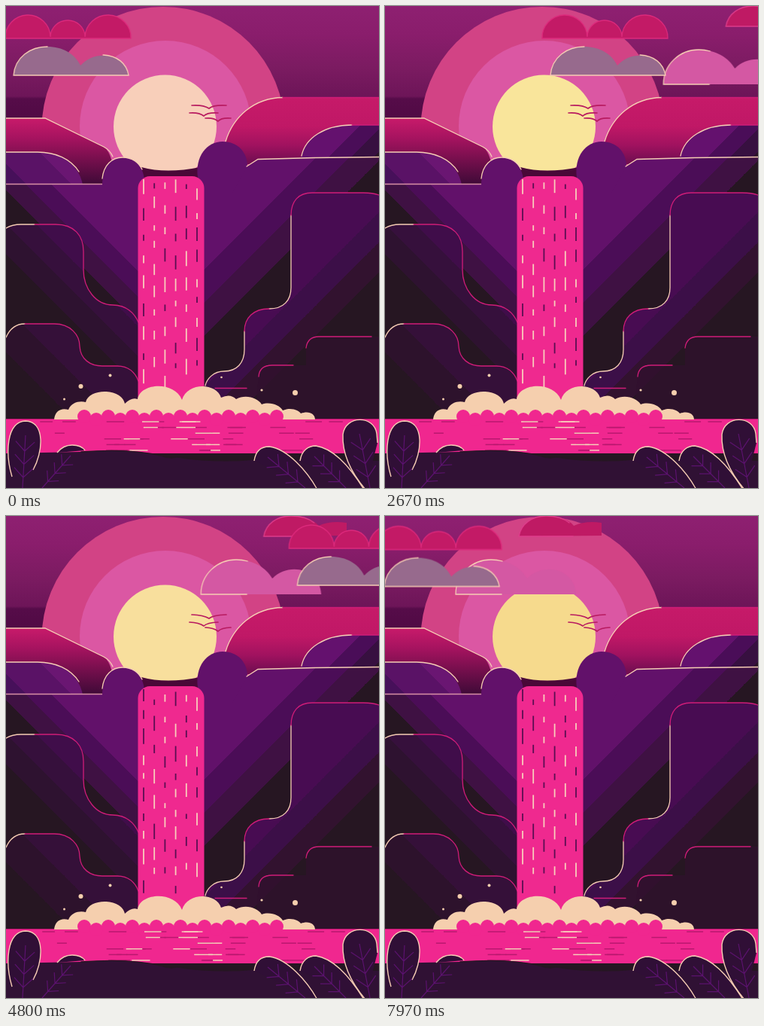
Write an HTML page that moves like this. It is 496 px wide and 640 px high and loops after 8000 ms.

```html
<!DOCTYPE html>
<html lang="en">
<head>
<meta charset="utf-8">
<title>Waterfall at dusk</title>
<style>
html, body { margin: 0; width: 100%; height: 100%; overflow: hidden; background: #251622; }
svg { display: block; width: 496px; height: 640px; }
.line { fill: none; stroke-width: 1.3; stroke-linecap: round; }
.cream { stroke: #f6cdb4; }
.pink { stroke: #cf1c78; }
.vein { fill: none; stroke: #5b126e; stroke-width: 1.2; }
.bird { fill: none; stroke: #b81b60; stroke-width: 1.7; stroke-linecap: round; }
.leaf { fill: #300f36; stroke: #f6cdb4; stroke-width: 1.4; }
</style>
</head>
<body>
<svg viewBox="0 0 496 640">
  <defs id="defs">
    <linearGradient id="sky" x2="0" y2="150" gradientUnits="userSpaceOnUse">
      <stop stop-color="#8e2071"/><stop offset=".25" stop-color="#8a1d6c"/>
      <stop offset=".55" stop-color="#7b1b61"/><stop offset=".8" stop-color="#6d1558"/>
      <stop offset=".82" stop-color="#560c49"/><stop offset="1" stop-color="#500a44"/>
    </linearGradient>
    <linearGradient id="redLeft" x2="0" y1="150" y2="236" gradientUnits="userSpaceOnUse">
      <stop stop-color="#c71a6a"/><stop offset=".3" stop-color="#a5135f"/>
      <stop offset="1" stop-color="#400a38"/>
    </linearGradient>
    <linearGradient id="redRight" x2="0" y1="122" y2="206" gradientUnits="userSpaceOnUse">
      <stop stop-color="#c61a69"/><stop offset=".45" stop-color="#c01866"/>
      <stop offset=".75" stop-color="#a0125f"/><stop offset="1" stop-color="#740e52"/>
    </linearGradient>
  </defs>

  <rect width="496" height="240" fill="url(#sky)"/>
  <circle cx="209" cy="162.500" r="161.500" fill="#d24385"/>
  <circle cx="212" cy="160" r="114" fill="#db57a3"/>
  <circle id="sun" cx="211.500" cy="160" r="68.500"/>

  <g id="highCloud">
    <path d="M0 27C3 10 18 0 36 0C52 0 66 4 73 13C83 8 97 7 110 9V26Z" fill="#bf1a64"/>
    <path class="line" stroke="#de3d8b" d="M72 27H0C3 10 18 0 36 0C50 0 60 3 67 9"/>
  </g>
  <g id="pinkCloud">
    <path d="M0 104C0 77 22 58 47 58C70 58 87 69 95 83C116 61 158 69 160 104Z" fill="#d458a3"/>
    <path class="line cream" d="M61 104H0C0 77 22 58 47 58Q55 58 62 60"/>
  </g>
  <g id="lowClouds">
    <path class="line" d="M0 43A30 30 0 0 1 60 41A23 22 0 0 1 106 41A30.500 30 0 0 1 167 43Z" stroke="#dd2a7c" style="fill:#c31a66"/>
    <path d="M11 92C13 68 33 54 56 54C76 54 92 63 100 79C119 57 159 63 164 92Z" fill="#976a8d"/>
    <path class="line cream" d="M130 65C149 66 161 76 164 92H11C13 68 33 54 56 54"/>
  </g>

  <path d="M0 149H52L130 187Q143 196 145 237H0Z" fill="url(#redLeft)"/>
  <path class="line cream" d="M0 149H52L130 187Q138 191 142 200"/>
  <path d="M290 210L292 180C302 147 330 122 368 121.500H496V210Z" fill="url(#redRight)"/>
  <path class="line cream" d="M292 180C302 147 330 122 368 121.500"/>
  <path class="line pink" d="M368 121.500H496"/>
  <path d="M392 203C397 176 422 158 455 158H496V203Z" fill="url(#knoll)"/>
  <path class="line cream" d="M393 199C398 175 424 158 460 158"/>
  <path class="line pink" d="M460 158H496"/>

  <path d="M0 236H128L183 215V550H0Z" fill="url(#wallLeft)"/>
  <path d="M256 214H318L335 203L400 201L496 200V550H256Z" fill="url(#wallRight)"/>
  <path d="M180 214Q213 223 258 214V240H180Z" fill="#4a0838"/>
  <path d="M0 194H42C73 194 96 209 102 237H0Z" fill="url(#mound)"/>
  <path class="line cream" d="M0 194H42C66 194 86 203 97 220"/>
  <path class="line" stroke="#d78fa5" d="M0 236.500H128"/>
  <path d="M128 238C128 214 139 201 155 201C172 201 183 214 184 232V246H128Z" fill="#62116a"/>
  <path class="line cream" d="M128 229C130 211 141 201 155 201C168 201 177 208 181 217"/>
  <path d="M255 228C251 200 267 180 288 180C309 180 321 195 321 213L300 250H263Z" fill="#62116a"/>
  <path class="line cream" d="M320 213L335 203.500L410 201.500L496 200.500"/>

  <path d="M0 295Q8 290 20 290H66C91 290 103 305 103 326V350C103 376 120 397 142 397C160 397 171 408 177 422V550H0Z" fill="url(#cliffLeft)"/>
  <path class="line cream" d="M0 295Q8 290 20 290H38"/>
  <path class="line pink" d="M38 290H66C91 290 103 305 103 326V350C103 376 120 397 142 397C160 397 171 408 176 420"/>
  <path d="M0 440Q8 422 25 422H64C86 422 98 437 98 452C99 469 112 478 128 478H148C163 478 172 487 177 502V550H0Z" fill="url(#ledge)"/>
  <path class="line cream" d="M0 440Q8 422 25 422"/>
  <path class="line pink" d="M25 422H64C86 422 98 437 98 452C99 469 112 478 128 478H148C163 478 172 487 176 498"/>

  <path d="M496 251Q488 248 475 248H407C389 248 379 259 379 275V374C379 391 369 402 350 402C329 402 317 414 317 432V456C317 474 307 485 290 485C276 485 267 495 264 506V550H496Z" fill="url(#cliffRight)"/>
  <path class="line cream" d="M379 278V374C379 391 369 402 350 402M317 432V456C317 474 307 485 290 485C276 485 267 495 265 504"/>
  <path class="line pink" d="M496 251Q488 248 475 248H407C389 248 379 259 379 278M350 402C329 402 317 414 317 432"/>
  <path d="M399 455Q400 439 416 439H496V550H330L336 492Q337 477 354 477H399Z" fill="#32102f" opacity=".65"/>
  <path class="line pink" d="M399 454Q401 439 416 439H486M336 492Q337 477 354 477H382M278 507.500H320"/>

  <rect x="175.500" y="226" width="88" height="320" rx="16" fill="#ef298f"/>
  <g id="falls"></g>

  <rect y="548" width="496" height="50" fill="#f0278f"/>
  <path d="M0 548.500H496" stroke="#b9166d"/>
  <path d="M64 549C65 538 73 533 83 536C87 526 98 524 106 526C110 507 154 507 158 528Q167 519 175 522C179 500 224 498 234 523C241 499 280 500 286 520Q298 514 306 522C318 515 335 520 340 529C351 525 364 530 368 537C379 532 390 537 392 541C402 537 411 541 411 549Z" fill="#f5cfae"/>
  <g id="bubbles" fill="#f0278f"></g>
  <g id="water"></g>
  <g fill="#f5cfae">
    <circle cx="99.500" cy="505" r="3"/><circle cx="138.500" cy="490.500" r="2"/>
    <circle cx="77.500" cy="522" r="1.500"/><circle cx="286.500" cy="493" r="1.300"/>
    <circle cx="340" cy="510" r="1.600"/><circle cx="384.500" cy="513.500" r="3.500"/>
  </g>

  <path d="M0 594H496V640H0Z" fill="#261622"/>
  <path d="M0 640V594L100 592Q165 587 205 597Q218 602 228 599Q280 607 330 602L496 604V640Z" fill="#301134"/>
  <path class="line" stroke="#261622" d="M100 592Q165 587 205 597Q218 602 228 599Q280 607 330 602"/>
  <path class="leaf" d="M68 593Q76 583 88 583Q100 583 105 590"/>
  <path class="leaf" d="M8 625C-1 595 0 552 26 551C53 552 49 593 36 616"/>
  <path class="leaf" d="M330 604C332 590 340 585 350 585C374 588 400 617 414 642"/>
  <path class="leaf" d="M391 604C393 590 402 584 412 584C438 588 460 616 476 642"/>
  <path class="leaf" d="M478 642C456 616 447 591 448 569C451 543 490 543 493 568L494 580"/>
  <g id="veins"></g>
  <g id="birds"></g>
</svg>
<script>
const LOOP = 8000, FLIP = 500;
const CREAM = '#f8cdbb', SHADE = '#5a0f52', NIGHT = '#261622';
const byId = id => document.getElementById(id);

function add(parent, tag, attrs) {
  const el = document.createElementNS('http://www.w3.org/2000/svg', tag);
  for (const key in attrs) el.setAttribute(key, attrs[key]);
  return parent.appendChild(el);
}

function random(seed) {
  return () => (seed = seed * 16807 % 2147483647) / 2147483647;
}

function play(el, frames, duration = LOOP) {
  el.animate(frames, { duration, iterations: Infinity });
}

const at = (ms, x, y = 0) => ({ offset: ms / LOOP, transform: `translate(${x}px, ${y}px)` });

// Flat diagonal bands of shade, falling to the left (side -1) or right (side 1).
function bands(id, side, x, y, reach, colors) {
  const gradient = add(byId('defs'), 'linearGradient', {
    id, x1: x, y1: y, x2: x + side * reach, y2: y + reach, gradientUnits: 'userSpaceOnUse'
  });
  const last = colors.length - 2;
  for (let i = 0; i <= last; i++)
    for (const color of [colors[i], colors[i + 1]])
      add(gradient, 'stop', { offset: i / last, 'stop-color': color });
}

bands('wallLeft', -1, 50, 227, 34, ['#62116a', '#4b0d57', '#3f1143', NIGHT]);
bands('wallRight', 1, 300, 313, 44, ['#62116a', '#4b0d57', '#3f1143', NIGHT]);
bands('cliffLeft', -1, 70, 320, 40, ['#400d4a', '#36103c', '#2e1230', NIGHT]);
bands('cliffRight', 1, 400, 370, 40, ['#480c52', '#3c0f48', '#32122f', NIGHT]);
bands('ledge', -1, 60, 460, 30, ['#351039', '#2d122c', NIGHT]);
bands('knoll', 1, 440, 190, 30, ['#64116e', '#4a0d58', '#371040', '#2a1428']);
bands('mound', -1, 60, 210, 30, ['#6a1672', '#5a1266', '#47105a']);

// Two poses that trade places every half period.
function flipPair(parent, draw) {
  for (const pose of [0, 1]) {
    const group = add(parent, 'g', {});
    draw(group, pose);
    const first = 1 - pose;
    play(group, [
      { opacity: first, offset: 0 }, { opacity: first, offset: .5 },
      { opacity: pose, offset: .5 }, { opacity: pose, offset: 1 }
    ], FLIP);
  }
}

flipPair(byId('falls'), (group, pose) => {
  const rnd = random(311 + pose * 97);
  for (let column = 0; column < 6; column++) {
    const x = 183 + column * 14.2;
    for (let y = 230 + rnd() * 14; y < 492;) {
      const length = 6 + rnd() * 15;
      const stroke = rnd() < .5 ? SHADE : CREAM;
      add(group, 'path', { d: `M${x} ${y}v${length}`, stroke, 'stroke-width': 1.8 });
      y += length + 10 + rnd() * 14;
    }
  }
});

flipPair(byId('water'), (group, pose) => {
  const rnd = random(71);
  const dashes = (count, left, width, stroke) => {
    for (let i = 0; i < count; i++) {
      const x = left + rnd() * width + pose * 3, y = 552 + i % 6 * 7.6;
      add(group, 'path', { d: `M${x} ${y}h${12 + rnd() * 14}`, stroke, 'stroke-width': 1.5 });
    }
  };
  dashes(36, 45, 385, '#b9186f');
  dashes(13, 148, 128, CREAM);
});

function bird(group, x, y, span, pose) {
  const tip = y - 4 - pose, bend = tip + pose * 1.5 - 1;
  add(group, 'path', {
    class: 'bird',
    d: `M${x - span} ${tip}Q${x - span / 3} ${bend} ${x} ${y}Q${x + span / 4} ${bend} ${x + span} ${tip}`
  });
}

flipPair(byId('birds'), (group, pose) => {
  bird(group, 270, 136, 23, pose);
  bird(group, 263, 146, 19, pose);
  bird(group, 282, 153, 17, pose);
});

for (let i = 0; i < 17; i++)
  add(byId('bubbles'), 'circle', { cx: 104 + i * 16, cy: i % 2 ? 549 : 545, r: 9 });

// A midrib with pairs of side veins that lean towards the tip.
function veins(x, y, tipX, tipY) {
  const dx = tipX - x, dy = tipY - y;
  let d = `M${x} ${y}L${tipX} ${tipY}`;
  for (let t = .2; t < .8; t += .25)
    for (const side of [-1, 1])
      d += `M${x + dx * t} ${y + dy * t}l${dx * .18 - side * dy * .18} ${dy * .18 + side * dx * .18}`;
  add(byId('veins'), 'path', { class: 'vein', d });
}

veins(22, 640, 26, 570);
veins(48, 640, 86, 597);
veins(398, 640, 348, 599);
veins(452, 640, 410, 598);
veins(484, 640, 470, 568);

play(byId('lowClouds'), [at(0, -1), at(6400, 502), at(6400, -188.5, 3.5), at(LOOP, -8.6, 1.5)]);
play(byId('pinkCloud'), [at(0, 509.5), at(LOOP, 92.5)]);
play(byId('highCloud'), [at(0, 592), at(LOOP, 176.5)]);
play(byId('sun'), [
  { offset: 0, fill: '#f8cfba' }, { offset: .25, fill: '#f9e59b' }, { offset: .45, fill: '#f9e69a' },
  { offset: .87, fill: '#f7d3a2' }, { offset: 1, fill: '#f6da8c' }
]);
</script>
</body>
</html>
```
